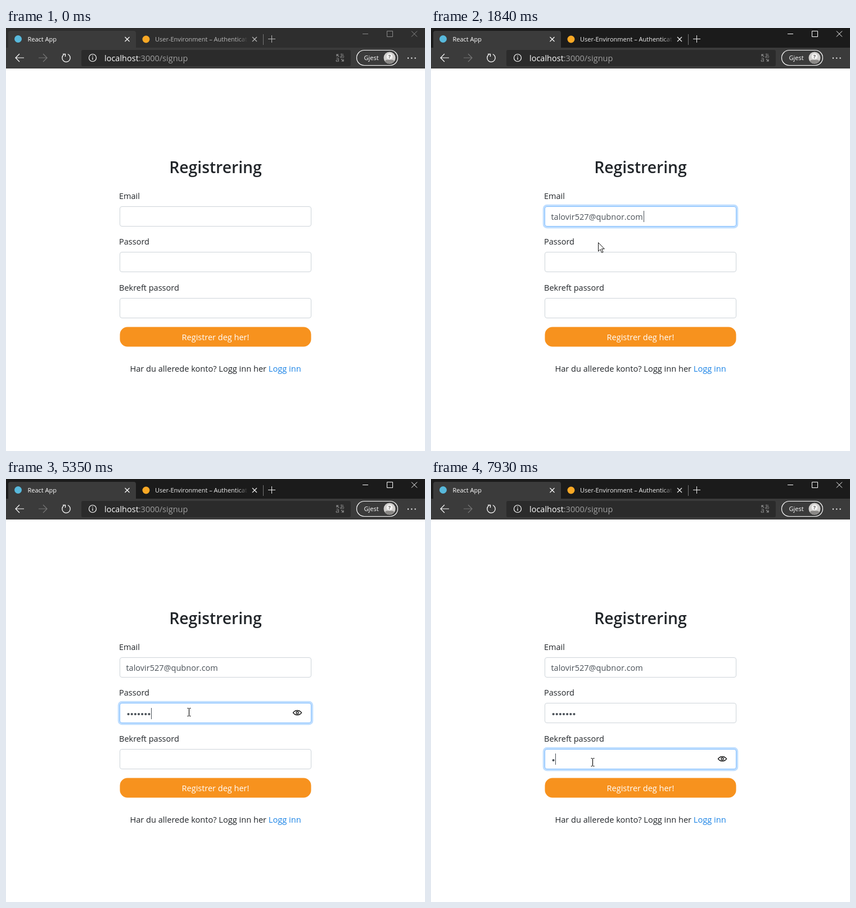
An HTML page that plays this animation: 745 by 752 pixels, repeating every 8 s.

```html
<!DOCTYPE html>
<html lang="no">
<head>
<meta charset="utf-8">
<title>Registrering</title>
<style>
  html, body { margin: 0; width: 100%; height: 100%; overflow: hidden; background: #fff; }
  svg { display: block; width: 745px; height: 752px; }
  text { font: 14.5px "Open Sans", "Noto Sans", sans-serif; fill: #212529; white-space: pre; }
  #chrome { --bar: #1b1b1b; --ink: #fff; --tab: #f0f0f0; }
  #chrome.idle { --bar: #2e2e2e; --ink: #8b8b8b; --tab: #b8b8b8; }
  .small { font-size: 11px; fill: #fff; }
  .line { fill: none; stroke: #fff; stroke-width: 1.2; }
  .ink { stroke: var(--ink); stroke-width: 1; }
  .value { fill: #495057; }
  .mid { text-anchor: middle; }
</style>
</head>
<body>
<svg viewBox="0 0 745 752">
  <defs>
    <linearGradient id="fade" gradientUnits="userSpaceOnUse" x1="412" x2="430">
      <stop stop-color="#fff"/><stop offset="1" stop-color="#000"/>
    </linearGradient>
    <mask id="clip" maskUnits="userSpaceOnUse" x="260" y="5" width="170" height="30">
      <rect x="260" y="5" width="170" height="30" fill="url(#fade)"/>
    </mask>
  </defs>
  <rect width="745" height="752" fill="#fff"/>

  <g id="chrome">
    <rect width="745" height="36" style="fill:var(--bar)"/>
    <rect y="35" width="745" height="37" fill="#3b3b3b"/>
    <path d="M4 36V9q0-4 4-4H227q4 0 4 4V36z" fill="#3b3b3b"/>
    <circle cx="21.5" cy="19.5" r="6.5" fill="#58b9dc"/>
    <text class="small" x="38.5" y="24">React App</text>
    <path class="line" d="M211.500 16l8 8m0-8l-8 8"/>
    <circle cx="249" cy="20" r="6.5" fill="#f9a825"/>
    <g mask="url(#clip)">
      <text class="small" x="265" y="24" style="fill:var(--tab)">User-Environment – Authentication</text>
    </g>
    <path class="line" d="M438 16l8 8m0-8l-8 8" style="stroke:var(--tab)"/>
    <path class="line" d="M457.5 11V30" style="stroke:#777;stroke-width:1"/>
    <path class="line" d="M466 19.5H479M472.5 13V26" style="stroke:var(--tab);stroke-width:1"/>
    <path class="line ink" d="M634 10.5H644M677.5 5.5h10v10h-10zM721 5.500l10 10m0-10l-10 10"/>

    <path class="line" d="M32 53H17.5M24 46l-7 7 7 7"/>
    <path class="line" d="M58 53H72.5M66 46l7 7-7 7" style="stroke:#777"/>
    <path class="line" d="M102.5 47.5A7.2 7.2 0 1 0 110 46.5M101 46.5h4.5v4.5" style="stroke-width:1.3"/>
    <rect x="134" y="39" width="479" height="29" rx="3" fill="#2b2b2b"/>
    <circle class="line" cx="154" cy="53" r="6.5"/>
    <path class="line" d="M154 52v4.5M154 49v1.5"/>
    <text x="175" y="59" style="fill:#fff">localhost<tspan fill="#a0a0a0">:3000/signup</tspan></text>
    <g style="--grey:#8f8f8f">
      <text x="586" y="60" style="font-size:12px;fill:var(--grey)">a</text>
      <text x="593" y="53" style="font:9px 'Noto Sans CJK JP','Noto Sans CJK',sans-serif;fill:var(--grey)">あ</text>
      <path class="line" d="M592 51l-4-4m0 3.5v-3.5h3.5M596 55l4 4m0-3.5v3.5h-3.5" style="stroke:var(--grey)"/>
    </g>
    <rect class="line" x="623.5" y="39.5" width="73" height="27" rx="13.5"/>
    <text class="small" x="636.5" y="57">Gjest</text>
    <circle cx="682" cy="53" r="10.5" fill="#d2d0ce"/>
    <path d="M674 59.5q0-3 4-3h8q4 0 4 3a10.5 10.5 0 0 1-16 0z" fill="#8a8886"/>
    <circle cx="682" cy="50.5" r="5.3" fill="#f3f2f1"/>
    <text class="mid" x="682" y="54" style="font-size:9px;font-weight:700;fill:#605e5c">?</text>
    <path d="M714 52.5h2v2h-2zm6.3 0h2v2h-2zm6.3 0h2v2h-2z" fill="#fff"/>
  </g>

  <text class="mid" x="372.5" y="258" style="font-size:28.3px;font-weight:600">Registrering</text>
  <g id="form"></g>
  <rect x="202.5" y="531.5" width="340" height="35" rx="13.5" fill="#f7921e"/>
  <text class="mid" x="372.5" y="555" style="fill:#fff">Registrer deg her!</text>
  <text class="mid" x="372.5" y="611" style="font-size:14.6px">Har du allerede konto? Logg inn her <tspan fill="#1c84e6">Logg inn</tspan></text>

  <rect id="caret" width="1" height="20" fill="#495057"/>
  <circle id="press" r="11.5" fill="#ff0" fill-opacity=".5"/>
  <path id="arrow" d="M.5.5V16l3.6-3.4 2.5 5.7 2.4-1-2.5-5.6H11.3z" fill="#fff" stroke="#111"/>
  <path id="beam" d="M-3-7H-.7M.7-7H3M-3 7H-.7M.7 7H3M0-6.5V6.5" fill="none" stroke="#000" stroke-width="1.1"/>
</svg>

<script>
const LOOP = 8000;
const EMAIL = "talovir527@qubnor.com";
const $ = id => document.getElementById(id);
const set = (el, attrs) => { for (const k in attrs) el.setAttribute(k, attrs[k]); };
const show = (el, on) => set(el, { visibility: on ? "visible" : "hidden" });

function add(parent, tag, attrs, text = "") {
  const el = document.createElementNS("http://www.w3.org/2000/svg", tag);
  set(el, attrs);
  el.textContent = text;
  parent.append(el);
  return el;
}

// Each row: start time, then the values held until the next row.
const pointer = [
  [530, 352, 691, "arrow"], [610, 343, 640, "arrow"], [680, 325, 560, "arrow"],
  [760, 303, 475, "arrow"], [840, 281, 400, "arrow"], [910, 266, 352.5, "beam"],
  [990, 259, 332.5, "beam"], [1060, 257, 326.5, "beam"],
  [1840, 297, 381, "arrow"], [1920, 327, 408.5, "beam"],
  [5280, 325, 414.5, "beam"], [5360, 317, 437, "arrow"], [5430, 302, 468, "arrow"],
  [5510, 291, 500.5, "beam"], [5590, 288, 508.5, "beam"], [5740, 287, 503.5, "beam"]
];
const presses = [[1060, 1290], [2240, 2380], [5740, 5990]];
const caretOn = [[1140, 2070], [2240, 2780], [3240, 5430], [5820, 6370], [6920, 7470], [7930, LOOP]];
const typed = [[], [3240, 3470, 3790, 4020, 4340, 4650, 4880], [7930]];
const focus = [[1140, 2240], [2240, 5820], [5820, LOOP + 1000]];
const ACTIVE = 1060, PASTE = 1520, GLOW = 3.2;

const inside = (spans, t) => spans.some(([a, b]) => t >= a && t < b);
const count = (times, t) => times.filter(at => t >= at).length;
// Focus changes in two visible steps.
const rise = dt => dt < 65 ? 0 : dt < 135 ? 0.5 : 1;
const mix = (a, b, p) => `rgb(${a.map((v, i) => Math.round(v + (b[i] - v) * p))})`;

const fields = [["Email", 317], ["Passord", 398], ["Bekreft passord", 480]].map(([label, y], i) => {
  const form = $("form");
  add(form, "text", { x: 201, y: y - 13.5 }, label);
  const ring = add(form, "rect", { fill: "#bfdeff" });
  const box = add(form, "rect", { x: 202.5, y: y + 0.5, width: 340, height: 35, rx: 3.5, fill: "#fff" });
  const value = add(form, "text", { x: 213.5, y: y + 24, class: "value" }, i ? "" : EMAIL);
  const dots = typed[i].map((_, n) =>
    add(form, "circle", { cx: 217.6 + 6.145 * n, cy: y + 20, r: 2.1, fill: "#495057" }));
  const eye = add(form, "g", { transform: `translate(518 ${y + 17.5})`, fill: "none", stroke: "#111", "stroke-width": 1.3 });
  add(eye, "path", { d: "M-7.5 0Q-4.5-4 0-4T7.5 0Q4.5 4 0 4T-7.5 0z" });
  add(eye, "circle", { r: 2 });
  return { y, ring, box, value, dots, eye };
});

function draw(t) {
  $("chrome").classList.toggle("idle", t < ACTIVE);

  fields.forEach((f, i) => {
    const [a, b] = focus[i];
    const p = t < a ? 0 : t < b ? rise(t - a) : 1 - rise(t - b);
    const n = count(typed[i], t);
    // The glow grows in width and strength together.
    const g = GLOW * p;
    set(f.ring, { x: 202 - g, y: f.y - g, width: 341 + 2 * g, height: 36 + 2 * g, rx: 4 + g, opacity: p });
    set(f.box, { stroke: mix([206, 212, 218], [128, 189, 255], p) });
    show(f.value, t >= PASTE);
    f.dots.forEach((d, k) => show(d, k < n));
    show(f.eye, n > 0 && t < b);
  });

  const at = focus.findIndex(([a, b]) => t >= a && t < b);
  show($("caret"), at >= 0 && inside(caretOn, t));
  if (at >= 0) {
    const n = count(typed[at], t);
    const x = at === 0 ? (t < PASTE ? 214 : 378) : n ? Math.floor(215 + 6.145 * n) : 214;
    set($("caret"), { x, y: fields[at].y + (at === 1 ? 9 : 8) });
  }

  const row = pointer[count(pointer.map(r => r[0]), t) - 1];
  for (const kind of ["arrow", "beam"]) {
    show($(kind), row && row[3] === kind);
    if (row) set($(kind), { transform: `translate(${row[1] + (kind === "beam" ? 0.5 : 0)} ${row[2]})` });
  }
  show($("press"), inside(presses, t));
  if (row) set($("press"), { cx: row[1] - 2, cy: row[2] - 1 });
}

function tick() {
  draw(performance.now() % LOOP);
  requestAnimationFrame(tick);
}
tick();
</script>
</body>
</html>
```
